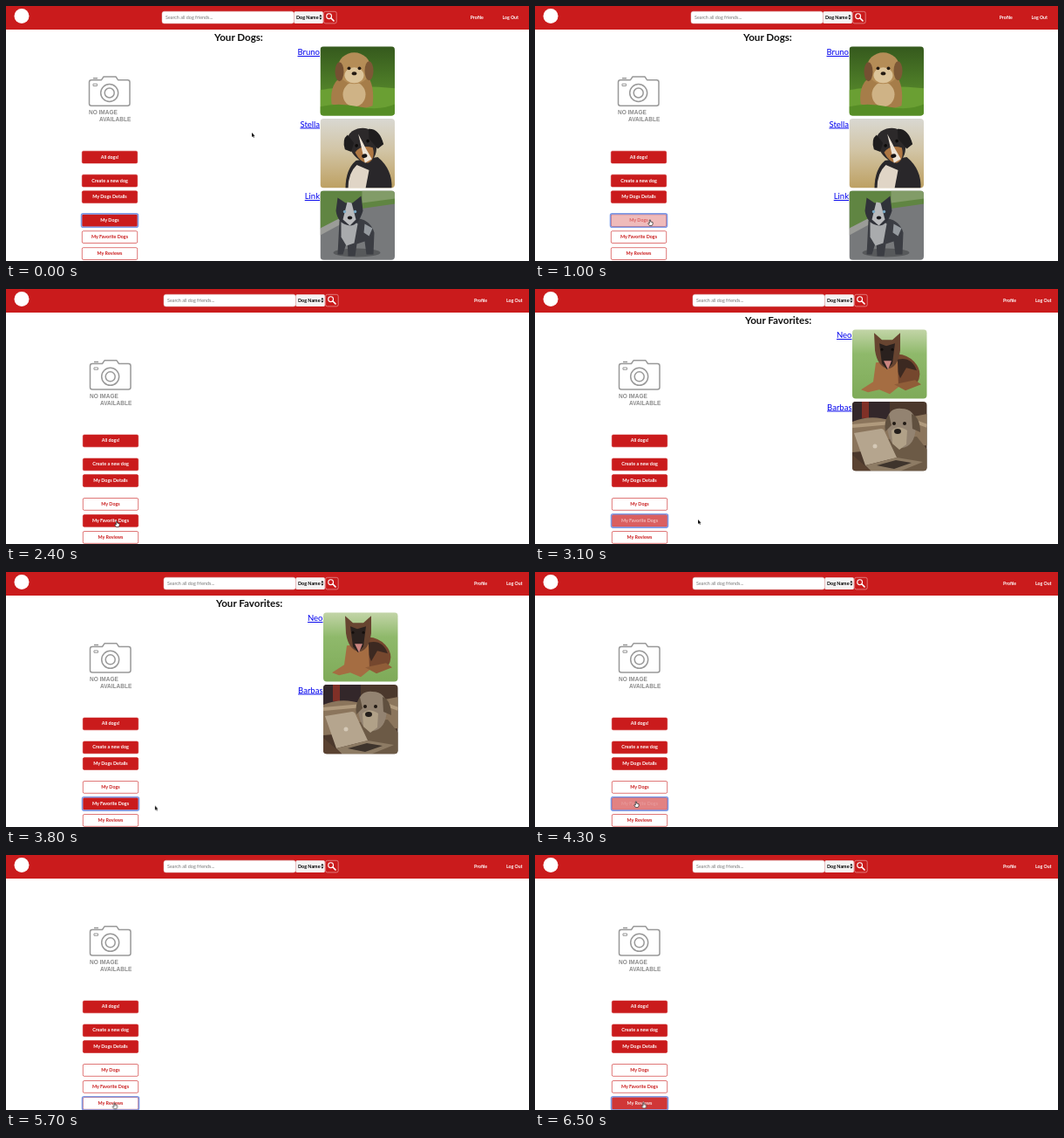
An HTML page for the animation above (6.6 s loop, 600 by 292 pixels).

```html
<!DOCTYPE html>
<html lang="en">
<head>
<meta charset="utf-8">
<title>Dog profile page</title>
<style>
html, body { margin: 0; width: 100%; height: 100%; overflow: hidden; background: #fff; }
svg { display: block; }
#stage { width: 600px; height: 292px; --red: #ca1b1c; font-family: Lato, "Open Sans", sans-serif; }
text { font-weight: 700; font-size: 5.4px; }
.title { font-size: 11.6px; fill: #111; }
.name { font-size: 9.5px; font-weight: 400; fill: #00e; text-anchor: end; text-decoration: underline; }
.hint { font-weight: 400; fill: #777; }
.nav { font-size: 5.2px; fill: #fff; }
.empty { font: 700 6.5px "Liberation Sans", Arial, sans-serif; fill: #8c8c8c; }

/* Buttons: --p is how far the red fill is in, --r the focus ring */
.btn { --p: 0; --r: 0; text-anchor: middle; }
.btn.solid { --p: 1; }
.btn rect {
  width: 63.4px; height: 13.8px; rx: 1.5px;
  fill: color-mix(in srgb, var(--red) calc(var(--p) * 100%), #fff);
  stroke: var(--red); stroke-width: .6;
}
.btn text { fill: color-mix(in srgb, #fff calc(var(--p) * 100%), var(--red)); }
.btn .ring {
  x: -.8px; y: -.8px; width: 65px; height: 15.4px; rx: 2px;
  fill: none; stroke: #7f9be6; stroke-width: 1.6; opacity: var(--r);
}

/* Every track is stepped at ten pictures a second */
.shift, .btn, .mine, .favs, .hand, .arrow, .cursor { animation: 6.6s step-end infinite; }
.shift { animation-name: shift; }
.mine { animation-name: mine; }
.favs { animation-name: favs; }
.hand { animation-name: hand; }
.arrow { animation-name: arrow; }
.cursor { animation-name: move; }
.b-dogs { animation-name: b-dogs; }
.b-favs { animation-name: b-favs; }
.b-revs { animation-name: b-revs; }

/* The page gets wider when the long list closes */
@keyframes shift {
  0% { transform: translate(var(--dx), var(--dy, 0px)); }
  24.23%, 100% { transform: none; }
}
@keyframes mine { 0% { visibility: visible; } 24.23%, 100% { visibility: hidden; } }
@keyframes favs {
  0% { visibility: hidden; }
  39.38% { visibility: visible; }
  65.14%, 100% { visibility: hidden; }
}
/* Hovering inverts a button, and so does opening or closing its list */
@keyframes b-dogs {
  0% { --p: 1; --r: 1; }
  15.14% { --p: .3; --r: 1; }
  16.65% { --p: 0; --r: 1; }
  24.23% { --p: .55; --r: 1; }
  25.75% { --p: 1; --r: 1; }
  31.81% { --p: .4; --r: 0; }
  33.32%, 100% { --p: 0; --r: 0; }
}
@keyframes b-favs {
  0% { --p: 0; --r: 0; }
  33.32% { --p: .5; --r: 0; }
  34.84% { --p: 1; --r: 0; }
  39.38% { --p: .5; --r: 1; }
  40.9% { --p: 0; --r: 1; }
  45.44% { --p: .3; --r: 1; }
  46.96% { --p: .7; --r: 1; }
  48.47% { --p: 1; --r: 1; }
  60.59% { --p: .4; --r: 1; }
  62.11% { --p: 0; --r: 1; }
  65.14% { --p: .55; --r: 1; }
  66.65% { --p: 1; --r: 1; }
  71.2% { --p: .4; --r: 0; }
  72.71%, 100% { --p: 0; --r: 0; }
}
@keyframes b-revs {
  0% { --p: 0; --r: 0; }
  71.2% { --p: .5; --r: 0; }
  72.71% { --p: 1; --r: 0; }
  78.77% { --p: .5; --r: 1; }
  80.29% { --p: 0; --r: 1; }
  96.95% { --p: .5; --r: 1; }
  98.47%, 100% { --p: .88; --r: 1; }
}
@keyframes hand {
  0% { visibility: hidden; }
  15.14% { visibility: visible; }
  45.44% { visibility: hidden; }
  60.59%, 100% { visibility: visible; }
}
@keyframes arrow {
  0% { visibility: visible; }
  15.14% { visibility: hidden; }
  45.44% { visibility: visible; }
  60.59%, 100% { visibility: hidden; }
}
@keyframes move {
  0% { transform: translate(282px, 145px); animation-timing-function: steps(10); }
  15.14% { transform: translate(132px, 245px); animation-timing-function: steps(9); }
  28.78% { transform: translate(130px, 247px); animation-timing-function: steps(4); }
  34.84% { transform: translate(127px, 266px); }
  43.93% { transform: translate(127px, 266px); animation-timing-function: steps(2); }
  46.96% { transform: translate(187px, 264px); animation-timing-function: steps(4); }
  53.02% { transform: translate(212px, 271px); animation-timing-function: steps(7); }
  63.63% { transform: translate(116px, 263px); }
  69.68% { transform: translate(116px, 263px); animation-timing-function: steps(2); }
  72.71% { transform: translate(124.5px, 284.5px); }
  84.84% { transform: translate(124.5px, 284.5px); animation-timing-function: steps(4); }
  90.89%, 100% { transform: translate(124.5px, 283.5px); }
}
</style>
</head>
<body>
<svg id="stage" viewBox="0 0 600 292">
  <defs>
    <clipPath id="frame"><rect width="85.5" height="79.3" rx="4"/></clipPath>
    <filter id="soft" x="-5%" y="-5%" width="110%" height="110%"><feGaussianBlur stdDeviation=".7"/></filter>
    <linearGradient id="lawn" x2="0" y2="1">
      <stop stop-color="#35591d"/><stop offset=".5" stop-color="#4c7a27"/><stop offset="1" stop-color="#659b30"/>
    </linearGradient>
    <linearGradient id="field" x2="0" y2="1">
      <stop stop-color="#d9d8d2"/><stop offset=".45" stop-color="#d2c5a6"/><stop offset="1" stop-color="#bda062"/>
    </linearGradient>
    <linearGradient id="meadow" x2="0" y2="1">
      <stop stop-color="#c3d5a8"/><stop offset=".35" stop-color="#8fb96b"/><stop offset="1" stop-color="#7eaa58"/>
    </linearGradient>
  </defs>

  <rect width="600" height="27" fill="#ca1b1c"/>
  <circle cx="18" cy="11.5" r="8.5" fill="#fff"/>

  <g class="shift" style="--dx:-2px">
    <rect x="181" y="6.2" width="151.2" height="13.8" rx="2.5" fill="#fff" stroke="#dcc" stroke-width=".5"/>
    <text class="hint" x="185" y="15.2">Search all dog friends...</text>
    <rect x="332.4" y="6.2" width="33.4" height="13.8" rx="1.5" fill="#f5f3f3"/>
    <text x="335" y="14.9">Dog Name</text>
    <path d="M361.4 12.2l1.5-2.4 1.5 2.4zm0 1.2l1.5 2.4 1.5-2.4z"/>
    <rect x="366.6" y="6.3" width="14.6" height="13.6" rx="2" fill="none" stroke="#efb5b5" stroke-width=".6"/>
    <g fill="none" stroke="#fff" stroke-linecap="round">
      <circle cx="372.6" cy="11.7" r="2.9" stroke-width="1.1"/>
      <path d="M375 14l3 3" stroke-width="1.7"/>
    </g>
  </g>
  <text class="nav shift" style="--dx:-4.3px" x="537" y="14.6">Profile</text>
  <text class="nav shift" style="--dx:-4.6px" x="574" y="14.6">Log Out</text>

  <g class="shift" style="--dx:-1px;--dy:-.8px">
    <g fill="none" stroke="#999" stroke-width="1.5" stroke-linejoin="round">
      <path d="M99 85.5h11.5l2.5-3.7h14l2.5 3.7h11q2.500 0 2.500 2.500v24.500q0 2.500-2.500 2.500h-41.500q-2.500 0-2.500-2.500v-24.500q0-2.500 2.500-2.500z"/>
      <circle cx="119.700" cy="100.300" r="10"/>
      <circle cx="119.700" cy="100.300" r="5.500"/>
      <path d="M101 83.500h5"/>
      <rect x="101" y="90" width="4.500" height="2.300" stroke-width="1"/>
    </g>
    <text class="empty" x="96" y="125.300">NO IMAGE</text>
    <text class="empty" x="108" y="133.300">AVAILABLE</text>

    <g class="btn solid" transform="translate(88.3 167)"><rect/><text x="31.7" y="8.4">All dogs!</text></g>
    <g class="btn solid" transform="translate(88.3 194)"><rect/><text x="31.7" y="8.4">Create a new dog</text></g>
    <g class="btn solid" transform="translate(88.3 212.6)"><rect/><text x="31.7" y="8.4">My Dogs Details</text></g>
    <g class="btn b-dogs" transform="translate(88.3 239.5)"><rect/><rect class="ring"/><text x="31.7" y="8.4">My Dogs</text></g>
    <g class="btn b-favs" transform="translate(88.3 258.5)"><rect/><rect class="ring"/><text x="31.7" y="8.4">My Favorite Dogs</text></g>
    <g class="btn b-revs" transform="translate(88.3 277.5)"><rect/><rect class="ring"/><text x="31.7" y="8.4">My Reviews</text></g>
  </g>

  <g class="mine">
    <text class="title" x="239" y="40">Your Dogs:</text>
    <text class="name" x="360" y="56">Bruno</text>
    <text class="name" x="360" y="138.5">Stella</text>
    <text class="name" x="360" y="221">Link</text>

    <g transform="translate(360.5 46.3)"><g clip-path="url(#frame)">
      <rect width="86" height="80" fill="url(#lawn)"/>
      <g filter="url(#soft)">
        <path d="M0 50q40-7 86-2v32H0z" fill="#6a9f33"/>
        <path d="M13 66q-3-26 16-34h24q10 12 7 36-20 8-47-2z" fill="#a67d49"/>
        <ellipse cx="39" cy="55" rx="13" ry="14" fill="#cfb386"/>
        <ellipse cx="39" cy="25" rx="19" ry="18" fill="#b58d57"/>
        <ellipse cx="22" cy="29" rx="5" ry="11" fill="#755032"/>
        <ellipse cx="56" cy="28" rx="5" ry="11" fill="#7d5836"/>
        <ellipse cx="39" cy="33" rx="11" ry="9" fill="#dcc49a"/>
        <circle cx="33" cy="25" r="1.9" fill="#241a12"/><circle cx="45" cy="25" r="1.900" fill="#241a12"/>
        <ellipse cx="39" cy="31" rx="2.800" ry="2" fill="#241a12"/>
        <path d="M0 80V69q20-5 44 0t42-3v14z" fill="#568d26"/>
      </g>
    </g></g>

    <g transform="translate(360.5 128.900)"><g clip-path="url(#frame)">
      <rect width="86" height="80" fill="url(#field)"/>
      <g filter="url(#soft)">
        <path d="M29 80q0-22 12-32l25-4q17 14 16 36z" fill="#29272a"/>
        <path d="M32 80q0-18 10-27l14 6-4 21z" fill="#e0d5c6"/>
        <g transform="rotate(-18 48 31)">
          <path d="M33 27q0-16 16-16 17 1 16 19-3 20-16 21-13-3-16-24z" fill="#2c292a"/>
          <path d="M36 14q-8 3-8 15l6 5 6-9zM61 15q12 3 11 22l-8 3-6-14z" fill="#1f1d1e"/>
          <path d="M38 36q9-7 21 1-1 14-11 15-8-3-10-16z" fill="#ad7642"/>
          <path d="M48 17l3 18 3 14-9 2z" fill="#eee4d6"/>
          <circle cx="42" cy="29" r="1.800" fill="#0d0b0a"/><circle cx="56" cy="28" r="1.800" fill="#0d0b0a"/>
          <ellipse cx="47" cy="43" rx="3.200" ry="2.300" fill="#171415"/>
        </g>
      </g>
    </g></g>

    <g transform="translate(360.5 211.5)"><g clip-path="url(#frame)">
      <rect width="86" height="80" fill="#77797b"/>
      <g filter="url(#soft)">
        <path d="M0 0h86v15L44 21 0 44z" fill="#608542"/>
        <path d="M48 0h38v9l-38 5z" fill="#829c68"/>
        <path d="M0 43l35-18 6 4L0 51z" fill="#9b9c98"/>
        <ellipse cx="42" cy="71" rx="27" ry="5" fill="#57595b"/>
        <path d="M22 34q33-9 40 14l-1 25h-8l-2-15-9 3-2 14h-8l-1-18-5 16h-6z" fill="#3b3d43"/>
        <path d="M24 36q12-5 19 2l-4 22-9 3-6-10z" fill="#a9abad"/>
        <path d="M18 23l2-15 9 6h8l10-8 2 17q-5 17-15 17-14-2-16-17z" fill="#303239"/>
        <path d="M31 13l5 1 5 19-7 7-8-7z" fill="#b9babc"/>
        <path d="M51 38l9 5-4 9-6-4z" fill="#959a9f"/>
        <circle cx="28" cy="24" r="1.700" fill="#79a7c2"/><circle cx="40" cy="24" r="1.700" fill="#79a7c2"/>
        <ellipse cx="34" cy="31" rx="2.700" ry="2" fill="#17171a"/>
      </g>
    </g></g>
  </g>

  <g class="favs">
    <text class="title" x="241" y="40">Your Favorites:</text>
    <text class="name" x="363.5" y="56">Neo</text>
    <text class="name" x="363.5" y="138.5">Barbas</text>

    <g transform="translate(364 46.3)"><g clip-path="url(#frame)">
      <rect width="86" height="80" fill="url(#meadow)"/>
      <g filter="url(#soft)">
        <path d="M31 37q23-17 40 0 11 12 3 25l-34 4z" fill="#75472e"/>
        <path d="M47 36q20-8 27 11l-12-3-7 12z" fill="#3c2921"/>
        <path d="M27 38l25-2 1 30-10 8-12-5-13 3-8-3 14-9z" fill="#a56d42"/>
        <path d="M48 63l24-5 7 5-18 7z" fill="#905d38"/>
        <path d="M26 24L25 4l9 8h12l9-8v20q-3 20-14 21-12-2-15-21z" fill="#674430"/>
        <path d="M31 16l8 3 10-3-3 23-6 7-6-7z" fill="#2a211e"/>
        <path d="M36 36l5 10 4-10z" fill="#ca8580"/>
        <circle cx="34" cy="23" r="1.5" fill="#130e0b"/><circle cx="46" cy="23" r="1.5" fill="#130e0b"/>
      </g>
    </g></g>

    <g transform="translate(364 128.9)"><g clip-path="url(#frame)">
      <rect width="86" height="80" fill="#4b382c"/>
      <g filter="url(#soft)">
        <path d="M0 0h43v20L0 23z" fill="#33272a"/>
        <path d="M11 0h8v19h-8z" fill="#803027"/>
        <path d="M0 23q22-9 44-1l42-8v36L0 58z" fill="#8b755c"/>
        <path d="M0 28l45-4M64 20l22 8" stroke="#b09a7d" stroke-width="4"/>
        <path d="M41 43l33-3 12 15v25H45z" fill="#6c5a46"/>
        <path d="M40 23q1-16 16-15 17 0 17 20-1 24-17 25-16-2-16-30z" fill="#938371"/>
        <path d="M42 14q-6 9-4 20l7-7zM68 14q10 4 10 21l-9-4z" fill="#60503f"/>
        <path d="M45 33q8-7 18 0l-1 16-8 6-8-7z" fill="#b1a188"/>
        <circle cx="48" cy="25" r="2" fill="#211914"/><circle cx="60" cy="25" r="2" fill="#211914"/>
        <ellipse cx="52" cy="34" rx="4" ry="3" fill="#241e1b"/>
        <path d="M2 36l31-5q3 0 4 3l14 30-36 9z" fill="#b5a58e"/>
        <path d="M15 73l36-9 30 5-27 11H22z" fill="#8d7b64"/>
        <path d="M28 73l22-6 18 3-20 7z" fill="#3e342c"/>
        <circle cx="26" cy="51" r="2.5" fill="#d4c8b6"/>
        <path d="M0 61l14 12 8 7H0z" fill="#5a4231"/>
      </g>
    </g></g>
  </g>

  <g class="cursor" stroke-linejoin="round">
    <path class="arrow" d="M0 0v5l1.2-1 .8 1.8.9-.4-.8-1.7h1.5z" fill="#111" stroke="#fff" stroke-width=".5" paint-order="stroke"/>
    <path class="hand" d="M-.7 0q.8-.8 1.300.1v2l2.500.5v2.300l-1 1.700h-2.600l-1.800-2.700.6-.5 1 .6z" fill="#fff" stroke="#222" stroke-width=".7"/>
  </g>
</svg>
</body>
</html>
```
